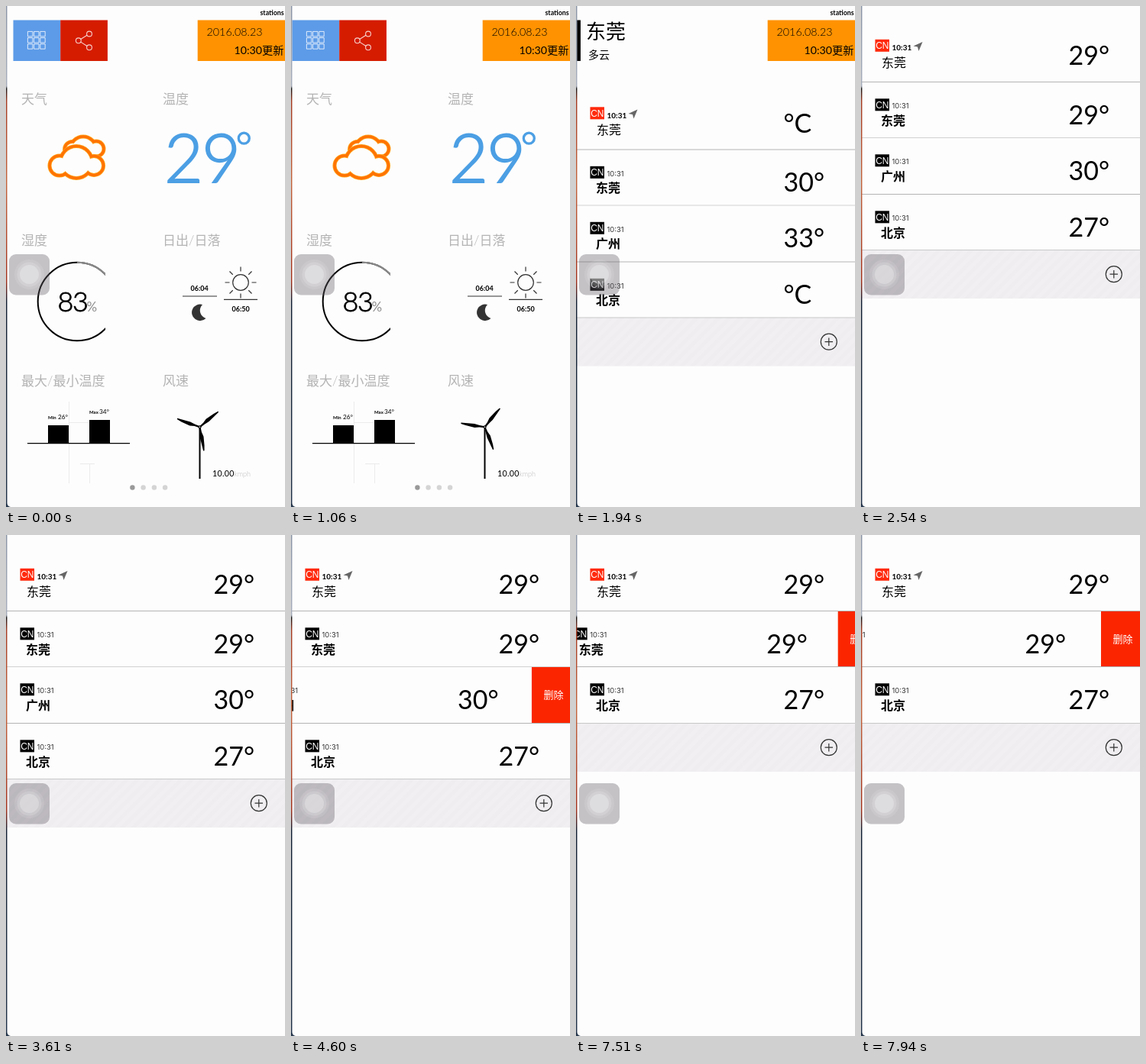
Recreate the animation shown at these times as an HTML page. Size 365x656 px, loop 8000 ms.

```html
<!DOCTYPE html>
<html lang="zh">
<head>
<meta charset="utf-8">
<style>
html, body { margin: 0; width: 100%; height: 100%; overflow: hidden; background: #fdfdfd; }
svg { display: block; width: 365px; height: 656px; }
text { font-family: Lato, "Noto Sans CJK SC", "Noto Sans CJK", sans-serif; white-space: pre; }
.label { font-size: 17px; font-weight: 300; fill: #b4b4b4; }
.bold { font-weight: 700; font-size: 9px; }
.temp { font-size: 34px; }
.city { font-size: 16px; font-weight: 700; }
.time { font: 9.4px Inter, sans-serif; fill: #333; }
.code { font: 12px "Liberation Sans", sans-serif; fill: #fff; }
.line { fill: none; stroke: #333; stroke-width: 1.2; }
.icon { fill: none; stroke: #fff; stroke-opacity: .8; }
</style>
</head>
<body>
<svg viewBox="0 0 365 656">
  <defs>
    <pattern id="stripes" width="10" height="10" patternUnits="userSpaceOnUse" patternTransform="rotate(45)">
      <rect width="10" height="10" fill="#f1eff2"/><rect width="5" height="10" fill="#efedf0"/>
    </pattern>
    <linearGradient id="edge" x2="0" y2="1">
      <stop offset="0" stop-color="#8d97a8"/><stop offset=".16" stop-color="#a9b0bd"/>
      <stop offset=".165" stop-color="#222"/><stop offset=".19" stop-color="#a8442c"/>
      <stop offset=".35" stop-color="#c46a45"/><stop offset=".55" stop-color="#a53a26"/>
      <stop offset=".59" stop-color="#1c2a3c"/><stop offset="1" stop-color="#2b3b50"/>
    </linearGradient>
    <clipPath id="dialClip"><rect x="30" y="325" width="100" height="125"/></clipPath>
  </defs>
  <rect width="365" height="656" fill="#fdfdfd"/>

  <g id="list">
    <g id="scroll">
      <rect x="1" y="18.5" width="5" height="53.5"/>
      <text x="13" y="43" font-size="26">东莞</text>
      <text x="16" y="69" font-size="14" font-weight="300">多云</text>
      <g id="rows"></g>
    </g>
  </g>

  <g id="dash">
    <rect width="365" height="656" fill="#fdfdfd"/>
    <g id="buttons">
      <rect y="18.5" width="61.7" height="53.5" fill="#5d9be8"/>
      <rect x="61.7" y="18.5" width="61.7" height="53.5" fill="#d51c00"/>
      <path id="grid" class="icon"/>
      <g class="icon" stroke-width="1.1">
        <circle cx="85.3" cy="45.3" r="3.4"/><circle cx="99.5" cy="36.5" r="3.4"/><circle cx="99.5" cy="54.3" r="3.4"/>
        <path d="M88.2 43.5L96.6 38.3M88.2 47.100L96.6 52.5"/>
      </g>
    </g>
    <text class="label" x="20" y="128">天气</text><text class="label" x="205" y="128">温度</text>
    <text class="label" x="20" y="313">湿度</text><text class="label" x="205" y="313">日出/日落</text>
    <text class="label" x="20" y="497">最大/最小温度</text><text class="label" x="205" y="497">风速</text>
    <g id="clouds"></g>

    <text x="207" y="231" font-size="88" font-weight="300" fill="#4c9fe4" stroke="#4c9fe4" stroke-width="1.8" letter-spacing="-2">29</text>
    <circle cx="311.3" cy="173.2" r="7" fill="none" stroke="#4c9fe4" stroke-width="3.3"/>

    <g clip-path="url(#dialClip)" fill="none" stroke-width="2">
      <circle cx="93" cy="387" r="51.3" stroke="#000"/>
      <path d="M93 335.7A51.3 51.3 0 0 1 144.3 387" stroke="#8c8c8c"/>
    </g>
    <text x="67.5" y="400" font-size="36" font-weight="300" stroke="#000" stroke-width=".8" letter-spacing="-1.5">83</text>
    <text x="105.5" y="400" font-size="17" fill="#8a8a8a">%</text>

    <g class="line">
      <circle cx="307" cy="362" r="10.3"/><path id="rays"/>
      <path d="M231 380H276M285 384.3H329"/>
    </g>
    <path d="M257 391A10.8 10.8 0 1 0 261.5 409A10.8 10.8 0 0 1 257 391" fill="#333"/>
    <text class="bold" x="241.5" y="373">06:04</text><text class="bold" x="295.5" y="399.5">06:50</text>

    <path d="M82.5 518V625M109.5 600V625M82 545.5H109M97 599.5H116" stroke="#e8e8e8" stroke-width=".8"/>
    <path d="M55 549H82V573H55ZM109 542H136V573H109ZM28 572H162V573.2H28Z"/>
    <text x="55" y="541" font-size="6" font-weight="700">Min</text><text x="68" y="541" font-size="8.3">26°</text>
    <text x="109" y="534" font-size="6" font-weight="700">Max</text><text x="122" y="534" font-size="8.3">34°</text>

    <path d="M253.5 551V619" stroke="#000" stroke-width="2"/>
    <g id="rotor"></g>
    <circle cx="253.5" cy="551.3" r="2"/><circle cx="253.5" cy="551.3" r=".8" fill="#fff"/>
    <text x="270" y="615.5" font-size="10.6" letter-spacing=".3">10.00</text>
    <text x="298.5" y="615.5" font-size="9" font-weight="300" fill="#bbb">kmph</text>
    <g fill="#d4d4d4">
      <circle cx="165.4" cy="630.5" r="3.2" fill="#999"/><circle cx="179.6" cy="630.5" r="3.2"/>
      <circle cx="193.9" cy="630.5" r="3.2"/><circle cx="208.1" cy="630.5" r="3.2"/>
    </g>
  </g>

  <g id="stamp">
    <text x="332.5" y="12" font-size="8.8" font-weight="700">stations</text>
    <rect x="250.700" y="18.5" width="114.300" height="53.5" fill="#ff9200"/>
    <text x="262.5" y="39" font-size="14.3" font-weight="300">2016.08.23</text>
    <text x="298.5" y="63" font-size="14.2">10:30更新</text>
  </g>

  <rect x="4" y="325" width="53" height="53.5" rx="9" fill="#625e64" opacity=".37"/>
  <g fill="#fff">
    <circle cx="30.5" cy="351.5" r="19.5" opacity=".1"/>
    <circle cx="30.5" cy="351.5" r="16" opacity=".15"/>
    <circle cx="30.5" cy="351.5" r="12.5" opacity=".25"/>
  </g>
  <rect width="1.5" height="656" fill="url(#edge)"/>
  <path d="M0 648Q1.5 655 6 656H0Z" fill="#2b3b50"/>
</svg>
<script>
const $ = id => document.getElementById(id);
const move = (el, x, y = 0) => el.setAttribute('transform', `translate(${x} ${y})`);
const clamp = v => Math.max(0, Math.min(1, v));
const span = (t, a, b) => clamp((t - a) / (b - a));
const easeOut = p => 1 - (1 - p) ** 3;
const easeBoth = p => p * p * (3 - 2 * p);

// Dashboard icons
let squares = '';
for (let i = 0; i < 9; i++) squares += `M${18.9 + i % 3 * 8.2} ${33.4 + (i / 3 | 0) * 8.2}h6.4v6.4h-6.4z`;
$('grid').setAttribute('d', squares);

let rays = '';
for (let i = 0; i < 8; i++) {
  const c = Math.cos(i * Math.PI / 4), s = Math.sin(i * Math.PI / 4);
  rays += `M${307 + 14.5 * c} ${362 + 14.5 * s}L${307 + 20.5 * c} ${362 + 20.5 * s}`;
}
$('rays').setAttribute('d', rays);

// A cloud is a union of circles, filled again and again at growing insets
const layers = [[0, '#ffa61c'], [.8, '#ff7300'], [4.3, '#ffa61c'], [5, '#fdfdfd']];
const cloud = lobes => layers.map(([inset, color]) => lobes.map(([x, y, r]) =>
  `<circle cx="${x}" cy="${y}" r="${r - inset}" fill="${color}"/>`).join('')).join('');
$('clouds').innerHTML =
  cloud([[87, 188, 13], [101, 188, 19.5], [118, 187, 12.5]]) +
  cloud([[70, 209, 15.5], [92, 204.5, 23.5], [115, 209, 15]]);

$('rotor').innerHTML = [0, 120, 240].map(a =>
  `<path d="M0 -1L7 -1.3L13 -2.8L25 -1.8L31.5 -.6V.8L14 2.1L7 1.3L0 1Z" transform="rotate(${a})"/>`).join('');

// Station list, placed as it rests after scrolling
const TOP = 99.5, STEP = 73.3, OPEN = 57, SCROLL = 88.5;
const cities = ['东莞', '东莞', '广州', '北京'];
const loading = ['°C', '30°', '33°', '°C'], loaded = ['29°', '29°', '30°', '27°'];
const rowTop = i => TOP + Math.round((i - 1) * STEP);

$('rows').innerHTML = cities.map((city, i) => {
  const first = i === 0, dy = first ? 4.5 : 0;
  return `<g class="row">
    <rect x="1" y="${first ? 10 : 0}" width="364" height="${first ? 63 : 74}" fill="#fdfdfd"/>
    <g class="cell">
      <rect x="18.5" y="${21.8 - dy}" width="18.5" height="16" fill="${first ? '#ff2a0c' : '#000'}"/>
      <text class="code" x="19.2" y="${34.2 - dy}">CN</text>
      <text class="${first ? 'bold' : 'time'}" x="40.5" y="${first ? 31.8 : 34.6}" ${first ? 'style="font-size:10px"' : ''}>10:31</text>
      ${first ? '<path d="M80.5 20.5L68.5 26L74 27L75.5 32.5Z" fill="#666"/>' : ''}
      <text class="city" x="${first ? 27 : 26}" y="${first ? 53.2 : 56}" ${first ? 'style="font-weight:400"' : ''}>${city}</text>
      <text class="temp" x="271.5" y="${55 - dy}"></text>
    </g>
    <g class="del"><rect width="70" height="74" fill="#fb2600"/>
      <text x="15.5" y="41.5" font-size="13" fill="#fff">删除</text></g>
    ${first ? '' : `<path d="M1 0H365" stroke="${i % 2 ? '#b4b4b4' : '#d2d2d2'}"/>`}
  </g>`;
}).join('') + `<g id="foot">
    <rect x="1" width="364" height="63.5" fill="url(#stripes)"/>
    <path d="M1 0H365" stroke="#c8c8c8"/>
    <circle class="line" cx="330.8" cy="31.7" r="10.5"/><path class="line" d="M325.5 31.7H336M330.8 26.5V37"/>
  </g>`;
const rows = [...document.querySelectorAll('.row')].map(el => ({
  el, cell: el.querySelector('.cell'), del: el.querySelector('.del'), temp: el.querySelector('.temp')
}));
for (const el of $('scroll').children) if (el.id !== 'rows') move(el, 0, -SCROLL);

const swipe = (t, start) => OPEN * easeOut(span(t, start, start + 400));

function draw(t) {
  // Dashboard
  move($('buttons'), 1.5 + 8 * (1 - easeOut(span(t, 60, 700))));
  $('rotor').setAttribute('transform', `translate(253.5 551.3) rotate(${80 + t * 109 / 1060})`);
  $('dash').style.opacity = 1 - span(t, 1720, 1890);
  $('dash').style.display = t < 1890 ? '' : 'none';

  // List
  const scroll = -SCROLL * easeOut(span(t, 1960, 2290));
  move($('scroll'), 0, SCROLL + scroll);
  move($('stamp'), 0, scroll);

  const gone = easeBoth(span(t, 5260, 5560));
  const shifts = [0, swipe(t, 7450), swipe(t, 4360), 0];
  rows.forEach((row, i) => {
    const s = shifts[i];
    move(row.el, 0, rowTop(i) + (i > 2 ? (rowTop(i - 1) - rowTop(i)) * gone : 0));
    row.el.style.display = i === 2 && gone === 1 ? 'none' : '';
    move(row.cell, -s);
    move(row.del, 365 - Math.min(s, 36.75 + s / 4));
    row.del.style.display = s ? '' : 'none';
    const value = (t < 2030 ? loading : loaded)[i];
    if (row.temp.textContent !== value) row.temp.textContent = value;
  });
  move($('foot'), 0, rowTop(4) + (rowTop(3) - rowTop(4)) * gone);
}

const start = performance.now();
function frame() {
  draw((performance.now() - start) % 8000);
  requestAnimationFrame(frame);
}
frame();
</script>
</body>
</html>
```
